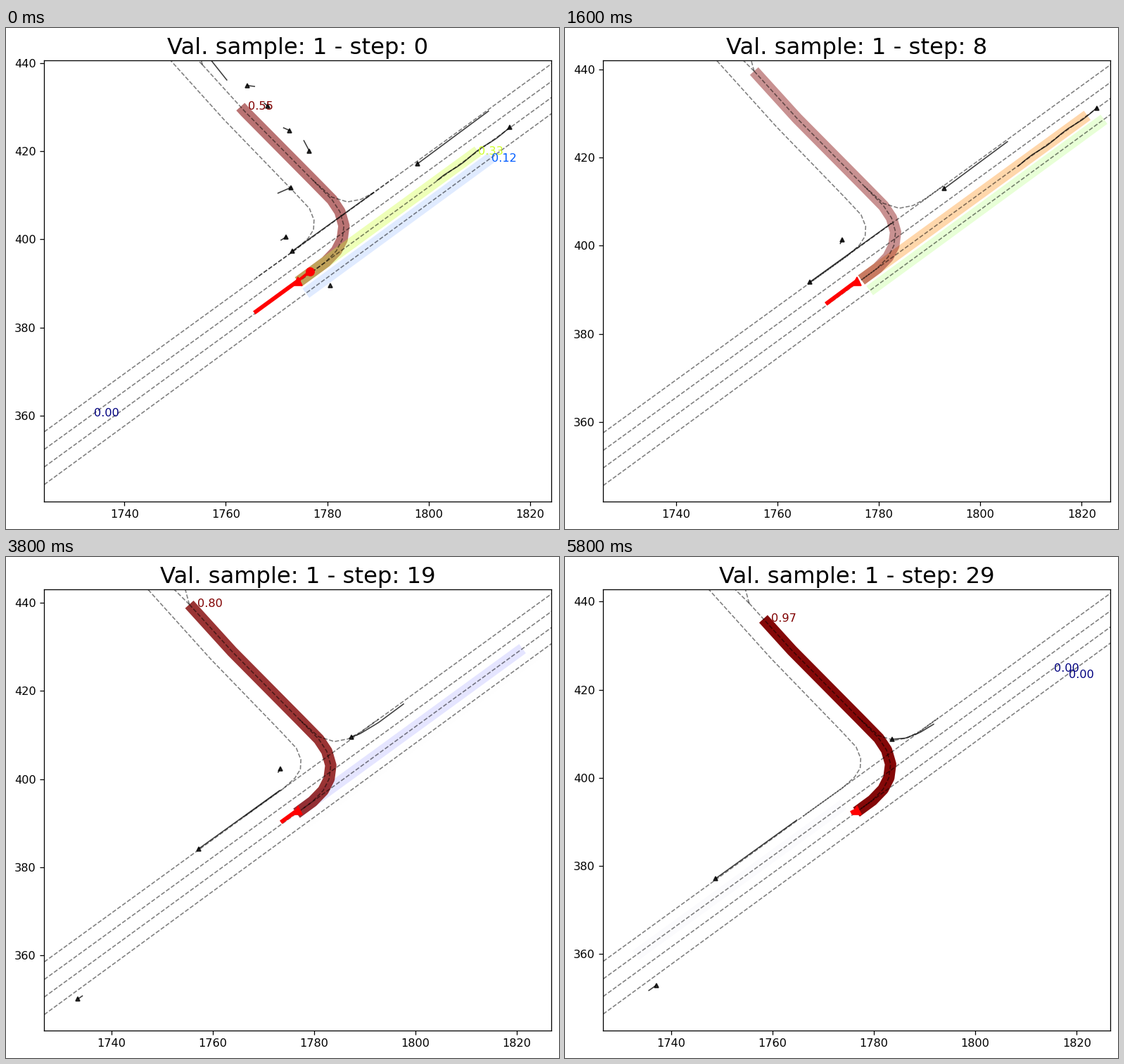
Write a matplotlib script that moves like this. It is 786x712 px and loops after 6 s.

```python
import numpy as np
import matplotlib as mpl
import matplotlib.pyplot as plt
from matplotlib.animation import FuncAnimation
from matplotlib.ticker import MultipleLocator

W, H, DPI = 786, 712, 116.25
STEPS, INTERVAL = 30, 200
JET = mpl.colormaps["jet"]

# Side street and its turning lanes
TURN = [(1779.7, 394.9), (1781.8, 397.4), (1782.95, 400), (1783.3, 403.1),
        (1782.5, 406.3), (1780.95, 409), (1777.2, 413.4), (1763.85, 428.9),
        (1755.4, 439.6)]
SIDE = [(1744.1, 447), (1759.7, 427.1), (1773.5, 410.7), (1776.5, 407),
        (1777.4, 404.4), (1777.3, 402.2), (1776.2, 400.2), (1773.8, 397.7),
        (1766, 391.3)]
MERGE = [(1777.2, 413.4), (1780.9, 409.6), (1784, 408.5), (1786.7, 409.1),
         (1789.1, 410.6), (1792.7, 413.6)]
FORK_B = [TURN[-1], (1749.5, 446.3)]
FORK_C = [TURN[-1], (1753.9, 446)]
EXIT = [(1783.5, 408.75), (1786.2, 409), (1789.1, 410.3), (1792.7, 412.8),
        (1811.8, 429.1)]

# Values at selected steps
KEYS = np.array([0, 3, 8, 12, 16, 23, 29])
EGO_X = [1774.19, 1774.88, 1775.64, 1776.34, 1776.69, 1776.9, 1776.62]
EGO_Y = [390.56, 391.2, 391.99, 392.55, 392.87, 393.1, 392.7]
P_TURN = [0.55, 0.45, 0.43, 0.46, 0.83, 0.75, 0.97]
P_MID = [0.33, 0.38, 0.33, 0.34, 0.16, 0.02, 0]
P_LOW = [0.12, 0.17, 0.235, 0.15, 0.01, 0, 0]
END_TURN = [430.1, 428.9, 439.6, 432.7, 439.6, 432.8, 436.05]
END_MID = [1809.7, 1809.9, 1821.1, 1815.5, 1821.1, 1815.6, 1815.5]
END_LOW = [1812.4, 1812.5, 1824.4, 1812.5, 1824.4, 1818.4, 1818.4]

# (first, last step): x, y, trail dx, trail dy, pace against the trail
WALKERS = {
    (0, 1): [(1776.5, 420, -1.1, 2.4, 0.1), (1771.9, 400.55, -1, -0.7, 0.1)],
    (0, 5): [(1756.5, 441.5, 3.7, -5.35, 0.4), (1764.26, 434.9, 1.4, -0.2),
             (1768.3, 430.2, -0.7, 0.7, 0.39),
             (1772.6, 424.7, -1.2, 0.6, 0.35),
             (1772.9, 411.8, -2.6, -1.3, 0.03), (1780.6, 389.5)],
    (2, 5): [(1777, 419.5, 0.3, 0.5), (1781.3, 390.2, -1.5, -1.3)],
    (6, 25): [(1772.7, 401.1, -0.4, -0.8, 0.12)],
    (10, 14): [(1782.1, 390.8)],
    (14, 18): [(1735.1, 351.5), (1736.2, 352.35), (1737.3, 353.2, 3.3, 2.7),
               (1743.7, 358.7, -1.2, -1)],
    (19, 25): [(1733.4, 350.1, 0.9, 0.7, 0.28)],
    (20, 26): [(1781.1, 390.05)],
    (26, 29): [(1736.4, 352.4, -1.5, -1.2, 0.16)],
}

fig = plt.figure(figsize=(W / DPI, H / DPI), dpi=DPI, facecolor="white")
ax = fig.add_axes([54.3 / W, 1 - 672.9 / H, 720.75 / W, 626.6 / H])


def at(vals, step):
    return float(np.interp(step, KEYS, vals))


def lane_y(lane, x):
    slope = 0.8345 + 0.0033 * max(0, lane - 2)
    return 360.33 - 3.99 * lane + slope * (np.asarray(x) - 1724.17)


def lane_pts(lane, x0, x1):
    return [(x, lane_y(lane, x)) for x in (x0, x1)]


def cut(pts, top):
    """Keep the part of an upward path below the height top."""
    pts = np.array(pts)
    below = pts[pts[:, 1] < top]
    return np.vstack([below, (np.interp(top, pts[:, 1], pts[:, 0]), top)])


def line(pts, **style):
    x, y = np.transpose(pts)
    ax.plot(x, y, **style)


def dashed(pts):
    line(pts, color="k", alpha=0.5, lw=1, ls="--", zorder=3)


def agent(pts):
    """Thin trail that ends in a triangle at the first point."""
    line(pts, color="k", alpha=0.75, lw=1, zorder=4)
    ax.plot(*pts[0], "^", color="k", alpha=0.8, ms=4, zorder=4)


def walker(age, x, y, dx=0, dy=0, pace=0):
    x, y = x - pace * dx * age, y - pace * dy * age
    agent([(x, y), (x + dx, y + dy)] if dx else [(x, y)])


def draw_road():
    for lane in range(1, 5):
        dashed(lane_pts(lane, 1700, 1850))
    start = (1776.6, lane_y(3, 1776.6))
    for pts in (SIDE, MERGE, FORK_B, FORK_C, TURN[::-1] + [start]):
        dashed(pts)


def draw_routes(step, cx, cy):
    k = int(np.argmin(abs(KEYS - step)))
    best, p_mid, p_low = (at(p, step) for p in (P_TURN, P_MID, P_LOW))
    x0, x_low = (1774.3, 1775.8) if step < 2 else (1776.55, 1778.2)
    turn = cut([(x0, lane_y(3, x0))] + TURN, END_TURN[k])

    routes = [(lane_pts(3, x0, END_MID[k]), p_mid), (turn, best)]
    if step < 2:
        routes.reverse()
    routes.insert(0, (lane_pts(4, x_low, END_LOW[k]), p_low))
    if k == 6:
        routes.append((lane_pts(2, 1733, 1774), 0.015))
    stem = [(1781.8, 409.6)] + TURN[5:8]
    if k == 5:
        routes.append((stem + FORK_B, 0.14))
    if k in (3, 5):
        routes.append((stem + FORK_C, 0.05 if k == 3 else 0.08))
    for pts, p in routes:
        if p > 0.004:
            line(pts, color=JET(p / best), alpha=p, lw=10,
                 solid_capstyle="butt", zorder=2)

    tags = [(turn[-1][0] + 1.55, END_TURN[k] - 0.6, best),
            (END_MID[k], lane_y(3, END_MID[k]) - 0.8, p_mid),
            (END_LOW[k], lane_y(4, END_LOW[k]) - 1, p_low)]
    if k == 0:
        tags.append((1734, 359.85, 0))
    elif k in (1, 3, 5):
        tags += [(1737.4, 366.55, 0),
                 (1739.3, 364.4, 0.01 if k == 5 else 0)]
    for x, y, p in tags:
        if abs(x - cx) < 44 and y - cy < 46.6:
            ax.text(x, y, f"{p:.2f}", color=JET(p / best), zorder=6)


def draw_agents(step):
    x = 1773.13 - 0.8388 * step
    y = 397.36 + 0.83 * (x - 1773.13)
    agent([(x, y), (x + 16, y + 13.25)])

    tip = 1797.8 - 0.65 * step + 0.0055 * step ** 2
    xs = np.linspace(tip, tip + 14 - 0.2 * step, 20)
    agent(list(zip(xs, np.interp(xs, *np.transpose(EXIT)))))

    if step < 19:
        xs = np.linspace(1816 + 0.87 * step, 1801.7 + 0.72 * step, 12)
        agent(list(zip(xs, lane_y(3, xs) + 0.18 * np.sin(0.9 * xs))))

    for (first, last), group in WALKERS.items():
        if first <= step <= last:
            for spec in group:
                walker(step - first, *spec)


def draw_ego(step, cx, cy):
    run = 0.55 * step - 0.0072 * step ** 2
    tail = (1765.93 + run, 383.63 + 0.87 * run)
    line([tail, (cx, cy)], color="red", lw=3.6, zorder=5)
    ax.plot(cx, cy, "^", color="red", ms=7, zorder=5)
    if step == 0:
        goal = (1776.6, 392.73)
        line([(cx, cy), goal], color="red", lw=2.5, zorder=5)
        ax.plot(*goal, "o", color="red", ms=7, zorder=5)


def update(step):
    ax.clear()
    cx, cy = at(EGO_X, step), at(EGO_Y, step)
    draw_road()
    draw_routes(step, cx, cy)
    draw_agents(step)
    draw_ego(step, cx, cy)
    ax.set_xlim(cx - 50, cx + 50)
    ax.set_ylim(cy - 50, cy + 50)
    for axis in (ax.xaxis, ax.yaxis):
        axis.set_major_locator(MultipleLocator(20))
    ax.set_title(f"Val. sample: 1 - step: {step}", fontsize=20)
    return []


anim = FuncAnimation(fig, update, frames=STEPS, interval=INTERVAL,
                     init_func=lambda: [], repeat=True, repeat_delay=0,
                     blit=False)
plt.show()
```
